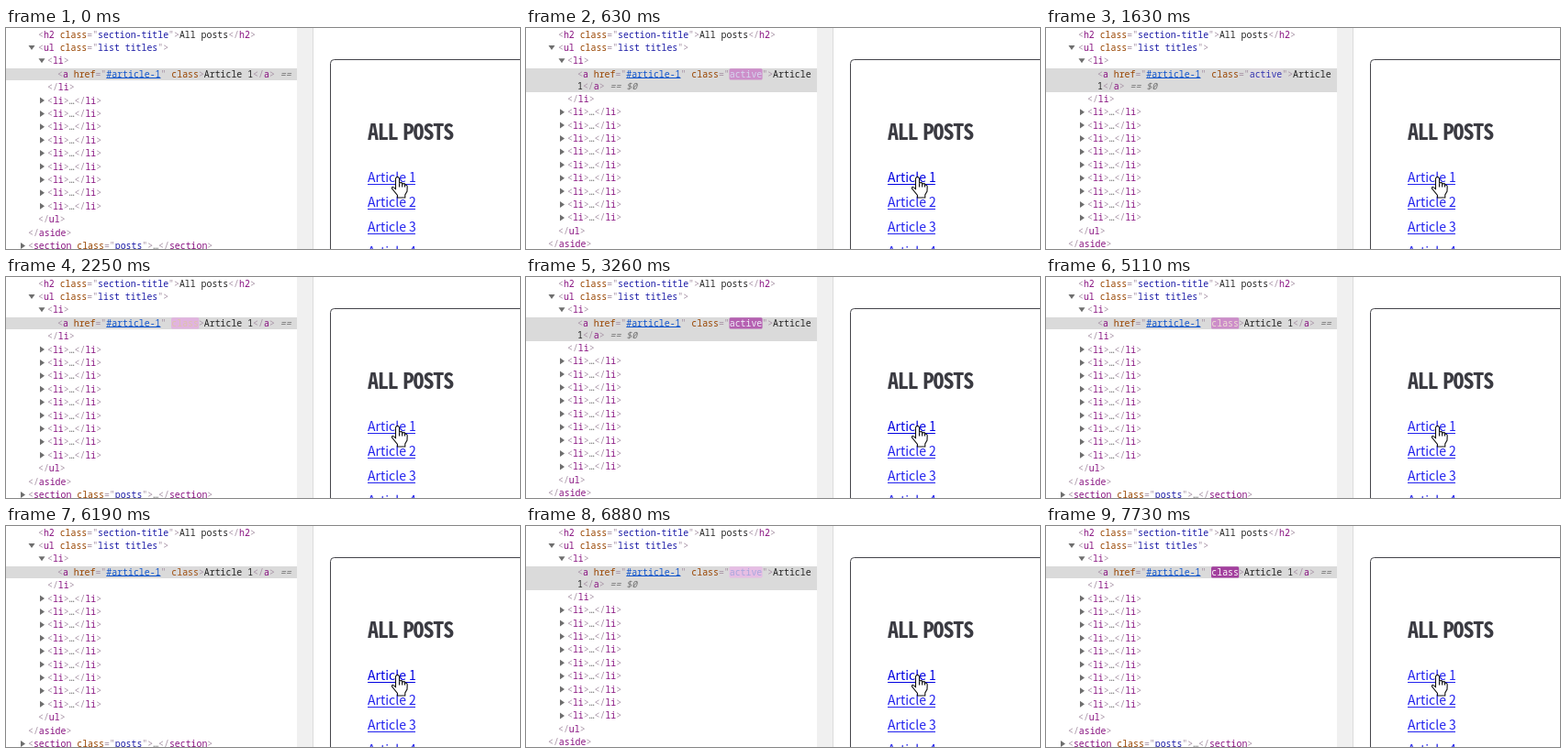
These frames come from a looping animation (560x241 px, 7.8 s). An HTML page with a canvas:

```html
<!DOCTYPE html>
<html lang="en">
<head>
<meta charset="utf-8">
<title>Toggling a class</title>
<style>
html, body { margin: 0; width: 100%; height: 100%; overflow: hidden; background: #fff; }
canvas { display: block; width: 560px; height: 241px; }
</style>
</head>
<body>
<canvas id="stage"></canvas>
<script>
const W = 560, H = 241, LOOP = 7800, PANE = 317;
const canvas = document.getElementById('stage');
const ctx = canvas.getContext('2d');
const dpr = window.devicePixelRatio || 1;
canvas.width = W * dpr;
canvas.height = H * dpr;

const MONO = '9.87px "Noto Sans Mono", "DejaVu Sans Mono", monospace';
const HEAD = 'bold 24px "Noto Sans Mono CJK JP", "Lato", sans-serif';
const LINK = '14px "Noto Sans CJK JP", "Noto Sans CJK", "Lato", sans-serif';
const CHAR = 5.92, PITCH = 14.4, WRAP = 12.7;
const PUNCT = [168, 148, 166], TAG = [136, 18, 128], NAME = [153, 69, 0],
      VALUE = [26, 26, 166], HREF = [17, 85, 204], TEXT = [34, 34, 34], GREY = [110, 110, 110];
const FLASH = [158, 54, 153], PALE = [245, 219, 244], ROW = [218, 218, 218], WHITE = [255, 255, 255];

// The page reacts first, the element tree follows.
const clicks = [
  { link: 70, tree: 380 }, { link: 1480, tree: 1790 }, { link: 2870, tree: 3170 },
  { link: 4550, tree: 4870 }, { link: 6040, tree: 6340 }, { link: 7420, tree: 7715 }
];

const rgb = c => `rgb(${c.map(Math.round).join(',')})`;
const mix = (a, b, k) => a.map((v, i) => v + (b[i] - v) * k);

// cubic-bezier(0, 0, 0.2, 1)
function ease(x) {
  let lo = 0, hi = 1;
  for (let i = 0; i < 24; i++) {
    const s = (lo + hi) / 2;
    if (0.6 * s * s + 0.4 * s * s * s < x) lo = s; else hi = s;
  }
  return lo * lo * (3 - 2 * lo);
}

function flashAt(age) {
  if (age < 0 || age >= 1400) return null;
  const back = age < 1120 ? mix(FLASH, PALE, ease(age / 1120))
                          : mix(PALE, ROW, ease((age - 1120) / 280));
  return { back, ink: age / 1400 };
}

// Draws [text, colour, option] runs on the character grid.
function runs(x, y, parts, flash) {
  for (const [str, colour, opt] of parts) {
    const w = str.length * CHAR;
    let ink = colour;
    if (opt === 'flash' && flash) {
      ctx.fillStyle = rgb(flash.back);
      ctx.beginPath();
      ctx.roundRect(x - 0.3, y - 6, w + 0.6, 12.4, 1.5);
      ctx.fill();
      ink = mix(WHITE, colour, flash.ink);
    }
    ctx.font = (opt === 'italic' ? 'italic ' : '') + MONO;
    ctx.fillStyle = rgb(ink);
    for (let i = 0; i < str.length; i++) ctx.fillText(str[i], x + i * CHAR, y + 3.5);
    if (opt === 'under') ctx.fillRect(x, Math.round(y) + 4, w, 1);
    x += w;
  }
}

const open = (tag, cls) => [['<', PUNCT], [tag, TAG]].concat(
  cls ? [[' ', PUNCT], ['class', NAME], ['="', PUNCT], [cls, VALUE], ['"', PUNCT]] : [],
  [['>', PUNCT]]);
const close = tag => [['</', PUNCT], [tag, TAG], ['>', PUNCT]];
const dots = [['…', GREY]];

function arrow(x, y, down) {
  ctx.fillStyle = '#6e6e6e';
  ctx.beginPath();
  if (down) {
    ctx.moveTo(x - 3.5, y - 2.5); ctx.lineTo(x + 3.5, y - 2.5); ctx.lineTo(x, y + 2.5);
  } else {
    ctx.moveTo(x - 2, y - 3.5); ctx.lineTo(x + 3, y); ctx.lineTo(x - 2, y + 3.5);
  }
  ctx.fill();
}

function drawTree(active, flash) {
  const row = n => 7 + n * PITCH;
  ctx.fillStyle = rgb(ROW);
  ctx.fillRect(0, 44, PANE, active ? 26 : 13);

  runs(35, row(0), [...open('h2', 'section-title'), ['All posts', TEXT], ...close('h2')]);
  arrow(28, row(1), true);
  runs(35, row(1), open('ul', 'list titles'));
  arrow(39, row(2), true);
  runs(45, row(2), open('li'));

  const anchor = [['<', PUNCT], ['a', TAG], [' ', PUNCT], ['href', NAME], ['="', PUNCT],
    ['#article-1', HREF, 'under'], ['" ', PUNCT]];
  if (active) {
    runs(56, row(3), [...anchor, ['class', NAME], ['="', PUNCT], ['active', VALUE, 'flash'],
      ['">', PUNCT], ['Article', TEXT]], flash);
    runs(56, row(3) + 13.2, [['1', TEXT], ...close('a'), [' == $0', GREY, 'italic']]);
  } else {
    runs(56, row(3), [...anchor, ['class', NAME, 'flash'], ['>', PUNCT], ['Article 1', TEXT],
      ...close('a'), [' ==', GREY, 'italic']], flash);
  }

  const low = n => row(n) + (active ? WRAP : 0);
  runs(45, low(4), close('li'));
  for (let n = 5; n < 14; n++) {
    arrow(39, low(n), false);
    runs(45, low(n), [...open('li'), ...dots, ...close('li')]);
  }
  runs(35, low(14), close('ul'));
  runs(24, low(15), close('aside'));
  arrow(18, low(16), false);
  runs(24, low(16), [...open('section', 'posts'), ...dots, ...close('section')]);
}

function drawHand() {
  ctx.beginPath();
  ctx.moveTo(424.5, 175.5);
  ctx.lineTo(424.5, 164);
  ctx.quadraticCurveTo(426.5, 160.8, 428.5, 164);
  ctx.lineTo(428.5, 169);
  ctx.quadraticCurveTo(431, 167.8, 432, 170);
  ctx.quadraticCurveTo(434, 169, 434.8, 171);
  ctx.quadraticCurveTo(437.3, 170.8, 437.2, 173.5);
  ctx.lineTo(437, 178);
  ctx.lineTo(434.8, 182);
  ctx.lineTo(434.8, 185);
  ctx.lineTo(426.5, 185);
  ctx.lineTo(426.5, 182.5);
  ctx.lineTo(420.5, 175);
  ctx.quadraticCurveTo(420.3, 171.6, 424.5, 175.5);
  ctx.closePath();
  ctx.fillStyle = '#fff';
  ctx.fill();
  ctx.strokeStyle = '#111';
  ctx.lineWidth = 1.1;
  ctx.stroke();
  ctx.beginPath();
  for (const x of [428.5, 431.7, 434.5]) { ctx.moveTo(x, 169.5); ctx.lineTo(x, 173.5); }
  ctx.stroke();
}

function drawPage(active) {
  ctx.fillStyle = '#f0f0f0';
  ctx.fillRect(PANE + 3, 0, 14, H);
  ctx.fillRect(PANE, 0, 3, H);
  ctx.fillStyle = '#dcdcdc';
  ctx.fillRect(334, 0, 1, H);

  ctx.strokeStyle = '#44444a';
  ctx.lineWidth = 1;
  ctx.beginPath();
  ctx.roundRect(353.5, 34.5, 300, 400, 4);
  ctx.stroke();

  ctx.fillStyle = '#3b3b42';
  ctx.font = HEAD;
  ctx.letterSpacing = '-1.1px';
  ctx.wordSpacing = '-5px';
  ctx.fillText('ALL POSTS', 394, 122);
  ctx.letterSpacing = ctx.wordSpacing = '0px';

  for (let i = 0; i < 4; i++) {
    const y = 168 + i * 27, label = 'Article ' + (i + 1);
    const strong = active && i === 0;
    ctx.font = (strong ? '500 ' : '300 ') + LINK;
    ctx.fillStyle = strong ? '#0000e0' : '#2222ee';
    ctx.fillText(label, 394, y);
    ctx.fillRect(394, y + 2, 52, 1);
  }
  drawHand();
}

function draw(t) {
  const linked = clicks.filter(c => c.link <= t).length % 2 === 1;
  const seen = clicks.filter(c => c.tree <= t);
  const flash = seen.length ? flashAt(t - seen[seen.length - 1].tree) : null;
  ctx.setTransform(dpr, 0, 0, dpr, 0, 0);
  ctx.fillStyle = '#fff';
  ctx.fillRect(0, 0, W, H);
  drawTree(seen.length % 2 === 1, flash);
  drawPage(linked);
}

const start = performance.now();
function tick() {
  draw((performance.now() - start) % LOOP);
  requestAnimationFrame(tick);
}
tick();
</script>
</body>
</html>
```
